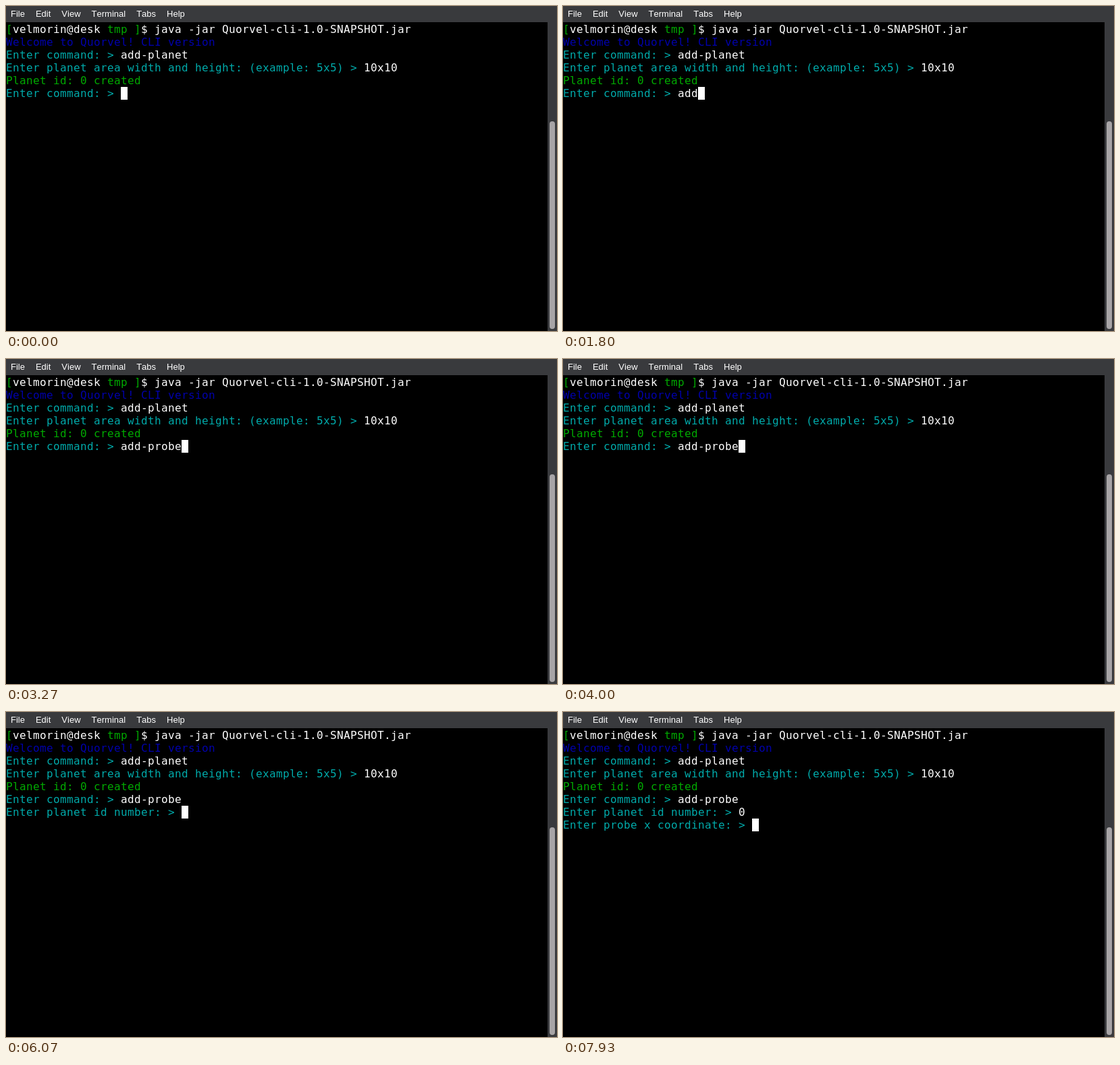
Recreate the animation shown at these times as an HTML page. Size 816 by 482 pixels, loop 8 s.

```html
<!DOCTYPE html>
<html lang="en">
<head>
<meta charset="utf-8">
<title>Terminal session</title>
<style>
  html, body { margin: 0; width: 100%; height: 100%; overflow: hidden; background: #000; }
  #stage { position: relative; width: 816px; height: 482px; overflow: hidden; }
  #menu {
    position: absolute; inset: 0 0 auto; height: 24px; box-sizing: border-box;
    padding-left: 7px; display: flex; gap: 16px; background: #393a3d; color: #fff;
    font: 13px/23px "Liberation Sans", Arial, sans-serif; font-kerning: none;
  }
  #track { position: absolute; left: 802px; top: 24px; width: 14px; height: 458px; background: #393a3d; }
  #thumb { position: absolute; left: 805px; top: 171px; width: 8px; height: 308px; border-radius: 4px; background: #a7a4a6; }
  /* Terminal grid: 10 x 19 pixel cells */
  #screen {
    position: absolute; left: 0; top: 25px; margin: 0; color: #fff;
    font: 16px/19px "DejaVu Sans Mono", monospace; letter-spacing: calc(10px - 1ch);
  }
  #cursor { position: absolute; width: 10px; height: 19px; background: #fff; }
  .green { color: #0a0; }
  .blue { color: #00a; }
  .cyan { color: #0aa; }
</style>
</head>
<body>
<div id="stage">
  <div id="menu"><span>File</span><span>Edit</span><span>View</span><span>Terminal</span><span>Tabs</span><span>Help</span></div>
  <div id="track"></div>
  <div id="thumb"></div>
  <pre id="screen"></pre>
  <div id="cursor"></div>
</div>
<script>
const LOOP = 8000, CELL_W = 10, ROW_H = 19, TOP = 25;
const screenEl = document.getElementById("screen");
const cursorEl = document.getElementById("cursor");

const paint = (color, text) => `<span class="${color}">${text.replace(/>/g, "&gt;")}</span>`;

const history = [
  paint("green", "[") + "velmorin@desk" + paint("green", " tmp ]") + "$ java -jar Quorvel-cli-1.0-SNAPSHOT.jar",
  paint("blue", "Welcome to Quorvel! CLI version"),
  paint("cyan", "Enter command: > ") + "add-planet",
  paint("cyan", "Enter planet area width and height: (example: 5x5) > ") + "10x10",
  paint("green", "Planet id: 0 created")
];

// Each prompt appears at its start time; keys holds the time of every keystroke.
const prompts = [
  { start: 0, label: "Enter command: > ", answer: "add-probe",
    keys: [1330, 1530, 1670, 2130, 2270, 2470, 2800, 3000, 3200] },
  { start: 4530, label: "Enter planet id number: > ", answer: "0", keys: [6600] },
  { start: 7400, label: "Enter probe x coordinate: > ", answer: "", keys: [] }
];

let lastHtml = "";

function render(time) {
  const visible = prompts.filter(p => time >= p.start);
  const typed = p => p.answer.slice(0, p.keys.filter(k => time >= k).length);
  const current = visible[visible.length - 1];

  const html = [...history, ...visible.map(p => paint("cyan", p.label) + typed(p))].join("\n");
  if (html !== lastHtml) screenEl.innerHTML = lastHtml = html;

  const column = current.label.length + typed(current).length;
  const row = history.length + visible.length - 1;
  cursorEl.style.left = column * CELL_W + "px";
  cursorEl.style.top = TOP + row * ROW_H + "px";
}

const begin = performance.now();
function tick() {
  render((performance.now() - begin) % LOOP);
  requestAnimationFrame(tick);
}
tick();
</script>
</body>
</html>
```
